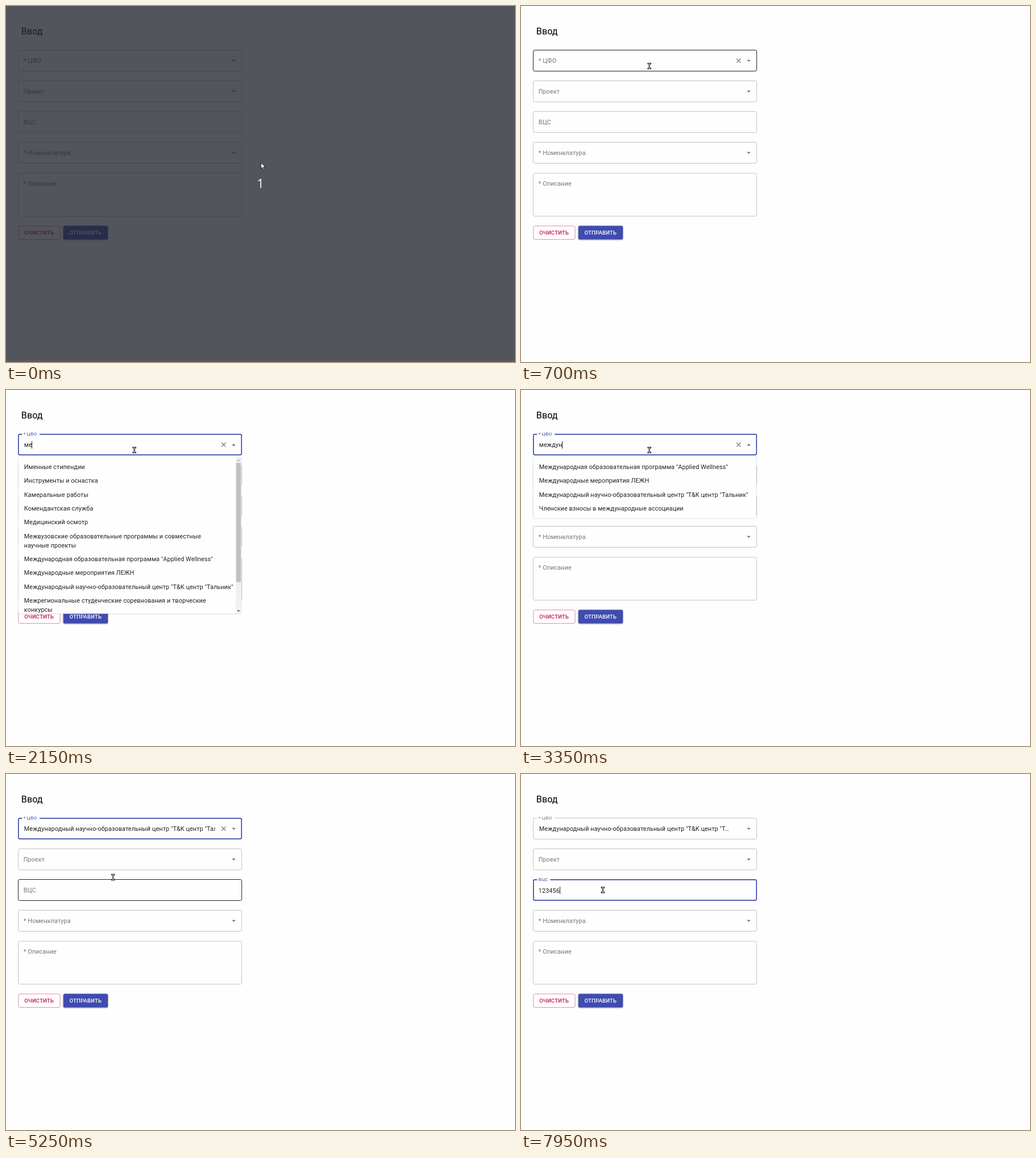
An HTML page for the animation above (8 s loop, 895 by 626 pixels).

```html
<!DOCTYPE html>
<html lang="ru">
<head>
<meta charset="utf-8">
<title>Ввод</title>
<style>
  html, body { margin: 0; width: 100%; height: 100%; overflow: hidden; background: #fefefe; }
  svg { display: block; font-family: Roboto, sans-serif; }
  text { font-size: 10.82px; letter-spacing: .00938em; white-space: pre; }
  .title { font-size: 16.2px; letter-spacing: 0; }
  .btn { font-size: 9.46px; font-weight: 500; letter-spacing: .02857em; text-anchor: middle; }
  .count { font: 21px "Open Sans", sans-serif; letter-spacing: 0; text-anchor: middle; }
  .paper { filter: drop-shadow(0 .8px .7px rgba(0,0,0,.32)) drop-shadow(0 .4px 1px rgba(0,0,0,.12)); }
  .raised { filter: drop-shadow(0 1.4px .9px rgba(0,0,0,.28)) drop-shadow(0 .6px 1.4px rgba(0,0,0,.14)); }
</style>
</head>
<body>
<svg id="stage" width="895" height="626" viewBox="0 0 895 626">
  <defs>
    <clipPath id="inputClip"><rect x="31" y="85" width="336.8" height="24"/></clipPath>
    <clipPath id="listClip"><rect x="21" y="118" width="393" height="275.6"/></clipPath>
  </defs>
  <g id="scene"></g>
</svg>
<script>
const LOOP = 8000, STEP = 50;
const BG = '#fefefe', INK = '#212121', GREY = '#757575', LINE = '#c4c4c4', BLUE = '#3f4bae', PINK = '#c2125c';
const ROW = 24.34, WRAP = 16.2, LIST_TOP = 118, LIST_MAX = 275.6;

const fields = [
  { label: '* ЦФО', y: 77, h: 38, select: true, notch: 30.7 },
  { label: 'Проект', y: 131, h: 38, select: true },
  { label: 'ВЦС', y: 185, h: 38, notch: 23 },
  { label: '* Номенклатура', y: 239, h: 38, select: true },
  { label: '* Описание', y: 293.5, h: 76.5 }
];

const centre = 'Международный научно-образовательный центр "T&K центр "Тальник"';
const centreShort = 'Международный научно-образовательный центр "T&K центр "Т…';

const options = [
  'Абитуриент', 'Административные расходы МЦ', 'Аккредитация ДВФУ',
  ...['ВИ-ШРМИ', 'ЛЕЖН', 'СПР', 'СПУР', 'ШБМ', 'ШЕН', 'ШЦЭ', 'ШЭМ'].map(s => 'РУЛЕН_' + s),
  'Именные стипендии', 'Инструменты и оснастка', 'Камеральные работы',
  'Комендантская служба', 'Медицинский осмотр',
  'Межвузовские образовательные программы и совместные\nнаучные проекты',
  'Международная образовательная программа "Applied Wellness"',
  'Международные мероприятия ЛЕЖН', centre,
  'Межрегиональные студенческие соревнования и творческие\nконкурсы',
  'Мероприятия по охране труда', 'Членские взносы в международные ассоциации'
];

// [time, value] tables; the last entry reached applies
const query = [[0, ''], [1950, 'м'], [2150, 'ме'], [2600, 'меж'], [2800, 'межд'], [3050, 'между'], [3350, 'междун']];
const code = [[0, ''], [6650, '1'], [6800, '123'], [7250, '1234'], [7550, '12345'], [7950, '123456']];
const hover = [[0, -1], [300, 3], [400, 2], [500, 1], [600, 0], [4750, -1], [5250, 2], [5500, -1], [5700, 2]];
const focus = [[0, -1], [1000, 0], [5950, 2]];
const caret = [[0, 0], [1100, 1], [1750, 0], [1950, 1], [3950, 0], [4550, 1], [4750, 0],
               [6000, 1], [6500, 0], [6650, 1]];
const shape = [[0, 'arrow'], [300, 'beam'], [4100, 'hand'], [5250, 'beam']];
const path = [[0, 448, 275], [299, 448, 275], [300, 449.6, 276], [700, 225.7, 105.7], [4050, 225.7, 105.7],
              [4400, 188.3, 181.5], [5350, 188.3, 181.5], [5550, 160, 226], [5650, 160, 226], [5850, 143.9, 203.8]];

const at = (table, t) => table.reduce((v, [k, x]) => t >= k ? x : v, table[0][1]);
const clamp = v => Math.max(0, Math.min(1, v));
const esc = s => s.replace(/&/g, '&amp;').replace(/</g, '&lt;');
const text = (s, x, y, fill, extra = '') => `<text x="${x}" y="${y}" fill="${fill}" ${extra}>${esc(s)}</text>`;
const rect = (x, y, w, h, fill, extra = '') => `<rect x="${x}" y="${y}" width="${w}" height="${h}" fill="${fill}" ${extra}/>`;
const shapePath = (d, extra) => `<path d="${d}" ${extra}/>`;

const pen = document.createElement('canvas').getContext('2d');
function widthOf(s) {
  pen.font = '10.82px Roboto, sans-serif';
  return pen.measureText(s).width + s.length * .1015;
}

function pointer(t) {
  let i = 0;
  while (i < path.length - 2 && t >= path[i + 1][0]) i++;
  const [t0, x0, y0] = path[i], [t1, x1, y1] = path[i + 1];
  const p = clamp((t - t0) / (t1 - t0)), e = p * p * (3 - 2 * p);
  return [x0 + (x1 - x0) * e, y0 + (y1 - y0) * e];
}

function drawPointer(t) {
  const [x, y] = pointer(t), kind = at(shape, t);
  const outline = 'fill="#fff" stroke="#111" stroke-width=".9" stroke-linejoin="round"';
  const beam = 'M-2 -4.4H2M0 -4.4V4.4M-2 4.4H2';
  const art = {
    arrow: shapePath('M.3 .5V11L2.8 8.7L4.6 12.6L6.3 11.8L4.6 8.1H8Z', outline),
    hand: shapePath('M-1.2 5.6V1.2Q-.3 -.2 .7 1.2V3.8L5 4.6Q6.1 5 5.9 6.4L5 9.6H-.6L-3.6 6.3Q-3.2 4.6 -1.2 5.6Z', outline),
    beam: shapePath(beam, 'stroke="#111" stroke-width="2.5" stroke-linecap="square" fill="none"') +
          shapePath(beam, 'stroke="#fff" stroke-width=".8" fill="none"')
  };
  return `<g transform="translate(${x} ${y})">${art[kind]}</g>`;
}

function drawField(f, i, t, state) {
  const active = state.focus === i, hot = state.hover === i;
  const start = i === 0 ? 950 : i === 2 ? 5900 : Infinity;
  const shrink = 1 - (1 - clamp((t - start) / 200)) ** 3;
  const weight = active ? 1.7 : 1, in2 = weight / 2;
  let s = rect(21 + in2, f.y + in2, 394 - weight, f.h - weight, 'none',
    `rx="2.6" stroke="${active ? BLUE : hot ? INK : LINE}" stroke-width="${weight}"`);
  if (shrink > 0) s += rect(28.3, f.y - .5, f.notch * shrink, 3, BG);

  const base = i === 4 ? 316.1 : f.y + 22.8;
  const y = base + (f.y + 3 - base) * shrink;
  s += `<g transform="translate(30.8 ${y}) scale(${1 - .25 * shrink})">${text(f.label, 0, 0, active ? BLUE : GREY)}</g>`;

  if (f.select) {
    const cy = f.y + 19.2, up = i === 0 && state.open ? -1 : 1;
    s += shapePath(`M397.1 ${cy - 1.5 * up}h6.8l-3.4 ${3.4 * up}z`, `fill="${GREY}"`);
    if (active || hot) s += shapePath(`M379 ${cy - 3.7}l7.4 7.4m0 -7.4l-7.4 7.4`, `stroke="${GREY}" stroke-width="1.15"`);
  }
  return s;
}

function drawInputs(t, state) {
  const typed = at(query, t), digits = at(code, t);
  const value = t >= 5950 ? centreShort : t >= 4750 ? centre : typed;
  let s = `<g clip-path="url(#inputClip)">${text(value, 31.8, 100.4, INK)}</g>` + text(digits, 30.8, 208.5, INK);
  if (at(caret, t)) {
    const first = state.focus === 0;
    const x = first ? 32 + widthOf(typed) : 31 + widthOf(digits);
    s += rect(Math.floor(x), first ? 90 : 198, 1, 13, INK);
  }
  return s;
}

function drawList(q) {
  const found = options.filter(o => o.toLowerCase().includes(q));
  let y = LIST_TOP + 5.1, rows = '';
  for (const item of found) {
    const lines = item.split('\n');
    lines.forEach((line, n) => rows += text(line, 31.8, y + 15.8 + n * WRAP, INK));
    y += ROW + (lines.length - 1) * WRAP;
  }
  const content = y + 5.4 - LIST_TOP, h = Math.min(content, LIST_MAX);
  let s = rect(21.3, LIST_TOP, 392.5, h, BG, 'rx="2.6" class="paper"') + rect(21, 115, 393, 4, BG) +
    `<g clip-path="url(#listClip)">${rows}</g>`;
  if (content > LIST_MAX) {
    const thumb = q ? 255 * LIST_MAX / content : 20;
    s += rect(404, LIST_TOP, 9.8, h, '#f1f1f1') + rect(404.8, 128, 8.2, thumb, '#c1c1c1') +
      shapePath('M406.4 124.8h5l-2.5 -2.8z', 'fill="#a3a3a3"') +
      shapePath('M406.4 387.2h5l-2.5 2.8z', 'fill="#505050"');
  }
  return s;
}

function drawButtons() {
  return rect(21.9, 386.8, 73.2, 23.6, BG, `rx="2.6" stroke="#df8cb0" stroke-width="1"`) +
    text('ОЧИСТИТЬ', 58.3, 402.1, PINK, 'class="btn"') +
    rect(100.8, 386.4, 78.4, 24.2, BLUE, 'rx="2.6" class="raised"') +
    text('ОТПРАВИТЬ', 139.9, 402.1, '#fff', 'class="btn"');
}

function draw(t) {
  const state = { focus: at(focus, t), hover: at(hover, t), open: t >= 1100 && t < 4750 };
  let s = rect(0, 0, 895, 626, BG) + text('Ввод', 26.8, 50.2, '#000', 'class="title"');
  s += fields.map((f, i) => drawField(f, i, t, state)).join('') + drawButtons();
  if (state.open) s += drawList(at(query, t));
  s += drawInputs(t, state);
  if (t < 300) {
    s += rect(0, 0, 895, 626, 'rgba(33,37,46,.775)') + rect(0, 622, 895, 4, 'rgba(255,255,255,.03)') +
      text('1', 447.5, 320.3, '#fff', 'class="count"');
  }
  return s + drawPointer(t);
}

const scene = document.getElementById('scene');
const begin = performance.now();
let last = -1;
function tick() {
  const t = Math.floor((performance.now() - begin) % LOOP / STEP) * STEP;
  if (t !== last) scene.innerHTML = draw(last = t);
  requestAnimationFrame(tick);
}
tick();
</script>
</body>
</html>
```
